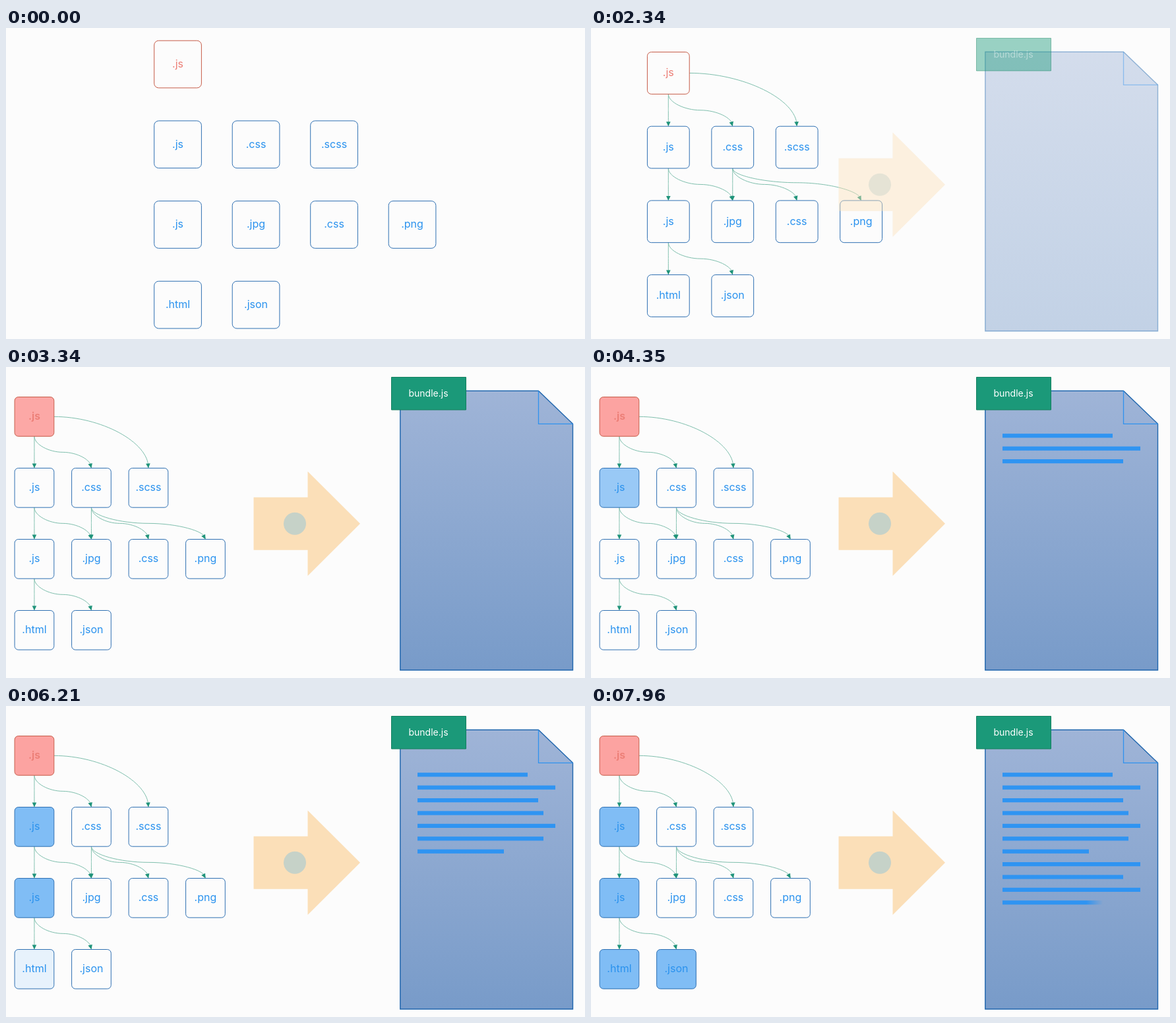
Animation, 878 px wide and 472 px high, one loop 8000 ms. Source, as an HTML page with a canvas:

```html
<!DOCTYPE html>
<html lang="en">
<head>
<meta charset="utf-8">
<title>Bundling modules</title>
<style>
  html, body { margin: 0; width: 100%; height: 100%; overflow: hidden; background: #fcfcfc; }
  canvas { display: block; }
</style>
</head>
<body>
<canvas id="stage" width="878" height="472"></canvas>
<script>
const ctx = document.getElementById('stage').getContext('2d');
const LOOP = 8000;
const FONT = 'Inter, "Open Sans", sans-serif';

const ROWS = ['.js', '.js .css .scss', '.js .jpg .css .png', '.html .json'].map(row => row.split(' '));

// Modules are bundled one after another: highlight first, then write lines.
const FIRST = 2870, PERIOD = 1085, FILL = 500, WRITE = 140;
const LINE_LENGTHS = [167, 209, 183, 191, 209, 191, 131, 209, 183, 209, 167];

const clamp = v => Math.max(0, Math.min(1, v));
const mix = (a, b, p) => a + (b - a) * p;
const span = (t, from, to) => clamp((t - from) / (to - from));
const ease = p => (1 - Math.cos(Math.PI * p)) / 2;
const moduleStart = order => FIRST + order * PERIOD;

// Down the first column, then along the last row.
const bundleOrder = (row, col) => col === 0 || row === ROWS.length - 1 ? row + col : Infinity;

// Scripts import the first two below, style sheets the rest of the row below.
function imports(label, col, below) {
  if (label === '.js') return below < 2;
  return label === '.css' && below >= col;
}

function polygon(points) {
  ctx.beginPath();
  points.forEach(([x, y]) => ctx.lineTo(x, y));
  ctx.closePath();
}

function stroke(color, width = 1) {
  ctx.strokeStyle = color;
  ctx.lineWidth = width;
  ctx.stroke();
}

function text(label, x, y, size, color, weight = 400) {
  ctx.font = `${weight} ${size}px ${FONT}`;
  ctx.textAlign = 'center';
  ctx.fillStyle = color;
  ctx.fillText(label, x, y);
}

// p = 0 is the wide layout, p = 1 the compact one.
function layout(p) {
  const size = mix(71.7, 59.7, p);
  return (row, col) => {
    const x = mix(224.7, 13.1, p) + col * mix(118.5, 86.5, p);
    const y = mix(19.2, 45.5, p) + row * mix(121.7, 108, p);
    return { x, y, size, cx: x + size / 2, cy: y + size / 2, right: x + size, bottom: y + size };
  };
}

function drawNode(label, box, row, col, t) {
  const root = row === 0;
  const start = moduleStart(bundleOrder(row, col));
  const amount = t > start ? span(t, start, start + FILL) : 0;
  ctx.beginPath();
  ctx.roundRect(box.x, box.y, box.size, box.size, box.size * 0.095);
  ctx.globalAlpha = amount;
  ctx.fillStyle = root ? '#fca3a1' : '#80bdf5';
  ctx.fill();
  ctx.globalAlpha = 1;
  stroke(root ? '#c65c48' : '#2f70b2');
  text(label, box.cx, box.cy + 5, 16, root ? '#ec7e76' : '#2a92ee', root && amount > 0.5 ? 600 : 400);
}

// Rounded corner from (x0, y0) to (x1, y1), leaving along one axis and arriving along the other.
function bend(x0, y0, x1, y1, vertical) {
  const k = 0.5;
  const mx = mix(x0, x1, k), my = mix(y0, y1, k);
  if (vertical) ctx.bezierCurveTo(x0, my, mx, y1, x1, y1);
  else ctx.bezierCurveTo(mx, y0, x1, my, x1, y1);
}

function arrowHead(x, y, rx, ry) {
  const length = 7;
  const lean = rx * (1 - Math.sqrt(1 - (length / ry) ** 2));
  ctx.save();
  ctx.translate(x, y);
  ctx.rotate(-Math.atan2(lean, length));
  polygon([[0, 0], [-3.3, -length], [3.3, -length]]);
  ctx.fillStyle = '#1f937a';
  ctx.fill();
  ctx.restore();
}

// S-curve from below one box to the top of another; drop is the height of its middle.
function drawLink(from, to, drop) {
  const mx = (from.cx + to.cx) / 2, my = mix(from.bottom, to.y, drop);
  ctx.beginPath();
  ctx.moveTo(from.cx, from.bottom);
  bend(from.cx, from.bottom, mx, my, true);
  bend(mx, my, to.cx, to.y - 1, false);
  stroke('#7fbfad');
  arrowHead(to.cx, to.y, to.cx - mx, to.y - my);
}

function drawSideLink(from, to) {
  ctx.beginPath();
  ctx.moveTo(from.right, from.cy);
  bend(from.right, from.cy, to.cx, to.y - 1, false);
  stroke('#7fbfad');
  arrowHead(to.cx, to.y, to.cx - from.right, to.y - from.cy);
}

function drawLinks(place, p) {
  ROWS.slice(1).forEach((children, row) => ROWS[row].forEach((label, col) => {
    children.forEach((_, below) => {
      if (!imports(label, col, below)) return;
      // Long links sit higher until the layout has contracted.
      const drop = 0.5 - 0.16 * Math.max(0, below - col - 1) * (1 - p);
      drawLink(place(row, col), place(row + 1, below), drop);
    });
  }));
  drawSideLink(place(0, 0), place(1, 2));
}

function drawBigArrow() {
  const left = 375.5, neck = 457.5, tip = 537, cy = 237.7;
  const shaft = 40, wing = 79.3;
  polygon([
    [left, cy - shaft], [neck, cy - shaft], [neck, cy - wing], [tip, cy],
    [neck, cy + wing], [neck, cy + shaft], [left, cy + shaft]
  ]);
  ctx.fillStyle = '#fbdfb8';
  ctx.fill();
  ctx.beginPath();
  ctx.arc(438, cy, 17, 0, Math.PI * 2);
  ctx.fillStyle = '#c6d2c8';
  ctx.fill();
}

function drawDocument() {
  const left = 597.8, right = 859.5, top = 36.2, bottom = 460;
  const foldX = 807.5, foldY = 86.3;
  const shade = ctx.createLinearGradient(0, top, 0, bottom);
  shade.addColorStop(0, '#9fb4d7');
  shade.addColorStop(1, '#789bc9');
  polygon([[left, top], [foldX, top], [right, foldY], [right, bottom], [left, bottom]]);
  ctx.fillStyle = shade;
  ctx.fill();
  stroke('#1f66ae', 1.4);
  ctx.beginPath();
  ctx.moveTo(foldX, top);
  ctx.lineTo(foldX, foldY);
  ctx.lineTo(right, foldY);
  stroke('#2f92ee', 1.3);

  ctx.beginPath();
  ctx.rect(584.5, 15.5, 113, 49.5);
  ctx.fillStyle = '#1b9979';
  ctx.fill();
  stroke('#14805f');
  text('bundle.js', 640.5, 44.8, 14, '#ffffff');
}

// Each line is wiped in from the left with a soft edge.
function drawLines(t) {
  const left = 624, soft = 25;
  LINE_LENGTHS.forEach((length, i) => {
    // The root module writes three lines, every other one two.
    const order = Math.max(0, Math.floor((i - 1) / 2));
    const place = order ? i - 1 - order * 2 : i;
    const start = moduleStart(order) + FILL + place * WRITE;
    if (t <= start) return;
    const front = left + span(t, start, start + WRITE) * (length + soft);
    const paint = ctx.createLinearGradient(front - soft, 0, front, 0);
    paint.addColorStop(0, 'rgba(47,148,242,1)');
    paint.addColorStop(1, 'rgba(47,148,242,0)');
    ctx.fillStyle = paint;
    ctx.fillRect(left, 101.2 + i * 19.4, length, 6.2);
  });
}

function draw(t) {
  const moved = ease(span(t, 1712, 2756));
  const place = layout(moved);

  ctx.globalAlpha = 1;
  ctx.fillStyle = '#fcfcfc';
  ctx.fillRect(0, 0, 878, 472);

  ctx.globalAlpha = ease(span(t, 550, 1560));
  drawLinks(place, moved);
  ctx.globalAlpha = 1;
  ROWS.forEach((labels, row) => labels.forEach((label, col) => {
    drawNode(label, place(row, col), row, col, t);
  }));

  ctx.globalAlpha = ease(span(t, 1950, 2800));
  drawBigArrow();
  drawDocument();
  ctx.globalAlpha = 1;
  drawLines(t);
}

const origin = performance.now();
function tick() {
  draw((performance.now() - origin) % LOOP);
  requestAnimationFrame(tick);
}
tick();
</script>
</body>
</html>
```
